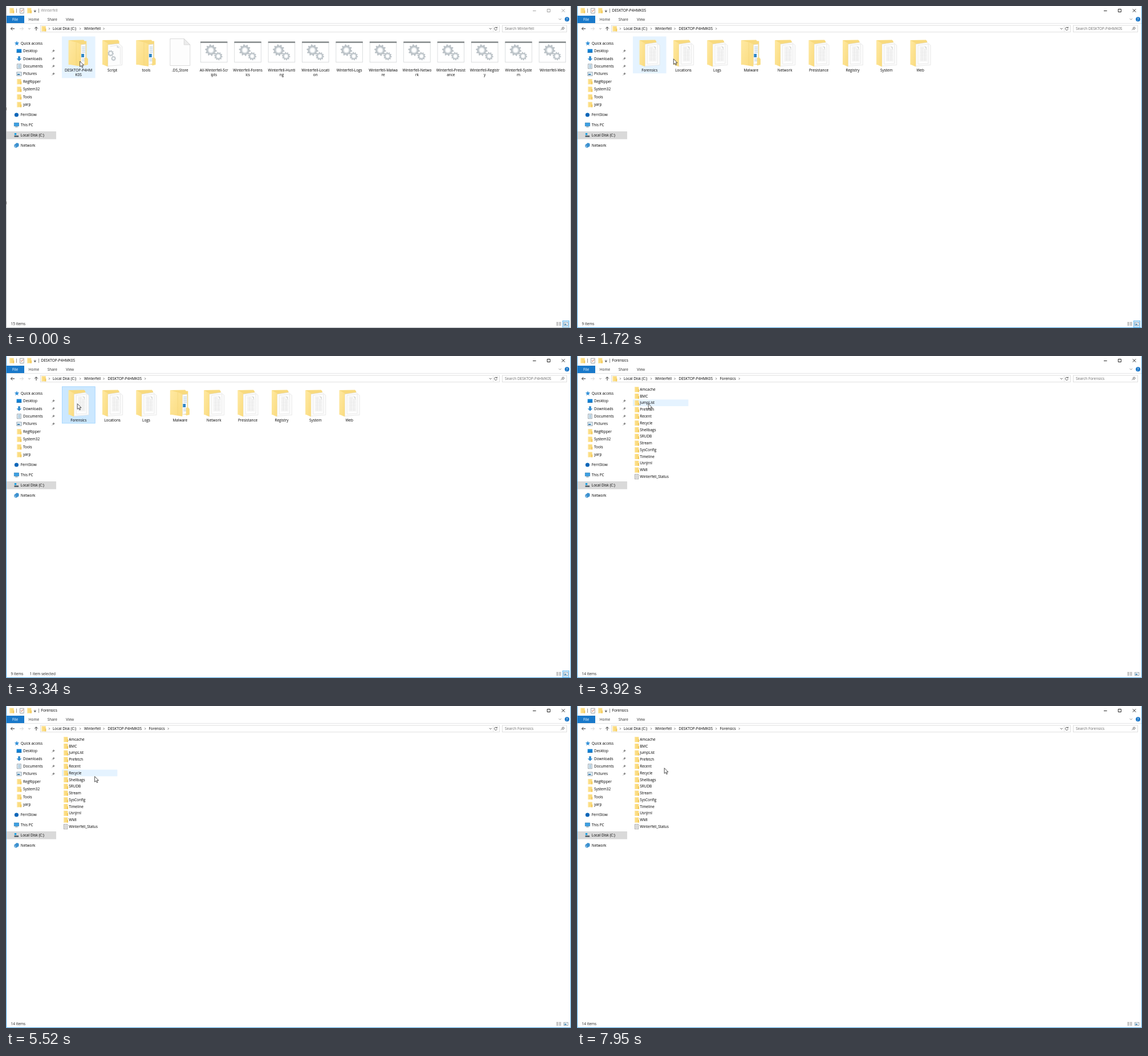
Animation, 991 px wide and 565 px high, one loop 8 s. Source, as an HTML page:

```html
<!DOCTYPE html>
<html lang="en">
<head>
<meta charset="utf-8">
<title>File browser</title>
<style>
html, body { margin: 0; width: 100%; height: 100%; overflow: hidden; background: #fff; }
svg { display: block; width: 991px; height: 565px; }
text { font-family: "Open Sans", "Noto Sans", sans-serif; font-size: 6.45px; white-space: pre; }
</style>
</head>
<body>
<svg id="stage" viewBox="0 0 991 565">
  <defs>
    <linearGradient id="flap" x2="1" y2="1">
      <stop offset="0" stop-color="#ffe9a2"/><stop offset="1" stop-color="#fadb7e"/>
    </linearGradient>
  </defs>
  <g id="window"></g>
  <g id="hover"></g>
  <g id="content"></g>
  <path id="cursor" d="M0 0V9.6L2.2 7.6L3.8 11L5.3 10.3L3.8 7H6.8Z" fill="#fff" stroke="#222" stroke-width=".8"/>
</svg>
<script>
const LOOP = 8000;
const $ = id => document.getElementById(id);

const rect = (x, y, w, h, fill, stroke = 'none', sw = 1) =>
  `<rect x="${x}" y="${y}" width="${w}" height="${h}" fill="${fill}" stroke="${stroke}" stroke-width="${sw}"/>`;
const fillPath = (d, fill, stroke = 'none', sw = .6) =>
  `<path d="${d}" fill="${fill}" stroke="${stroke}" stroke-width="${sw}"/>`;
const line = (d, stroke, sw = 1) => fillPath(d, 'none', stroke, sw);
const disc = (x, y, r, fill) => `<circle cx="${x}" cy="${y}" r="${r}" fill="${fill}"/>`;
const text = (x, mid, s, fill = '#000', anchor = 'start') =>
  `<text x="${x}" y="${mid + 2.2}" fill="${fill}" text-anchor="${anchor}">${s}</text>`;
const at = (x, y, body) => `<g transform="translate(${x} ${y})">${body}</g>`;

const chevron = (x, y) => line(`M${x - .8} ${y - 1.7}l1.7 1.7l-1.7 1.7`, '#555', .8);
const smallFolder = (x, y) =>
  rect(x, y - 4.4, 7.4, 9, '#fbdc80') + rect(x + 5.8, y - .2, 2.2, 4.8, '#f3c95c') +
  rect(x, y - 4.4, 1.4, 9, '#ffe9a9');

function gear(x, y, r, teeth) {
  const n = teeth * 4;
  const pts = Array.from({ length: n }, (_, i) => {
    const a = (i + .5) / n * Math.PI * 2;
    const q = i % 4 < 2 ? r : r * .78;
    return (x + q * Math.cos(a)).toFixed(2) + ' ' + (y + q * Math.sin(a)).toFixed(2);
  });
  return fillPath('M' + pts.join('L') + 'Z', '#bcc3c8') + disc(x, y, r * .53, '#dfe4e7') + disc(x, y, r * .36, '#fff');
}

// Large icons, centred on x = 0 of their cell.
const leaf = () => fillPath('M-17.4 60L-8 65.5V106.5L-17.4 102.5Z', 'url(#flap)');
const back = () => fillPath('M-17.4 60L10 59.5L12 62V103H-17.4Z', '#f8da7e');

function pageFolder() {
  let rows = '';
  for (let y = 72; y < 97; y += 2.4) rows += `M-1 ${y}H${y < 75 ? 7 : 12}`;
  return back() + fillPath('M-8 67L12 64L18 69V103.5L-8 105.5Z', '#fcfcfc', '#dcdcdc') +
    fillPath('M-4 69L14 67V101L-4 102Z', '#fdfdfd', '#dedede') +
    line(rows, '#dcdcdc', .7) + line('M3 72V96M8 75V96', '#e4e4e4', .6) +
    fillPath('M7 70l4 2v5z', '#d8dad8') + leaf();
}
function gearFolder() {
  return back() + fillPath('M-8 68L11 66L17 71V103.5L-8 105.5Z', '#fdfdfd', '#d5d5d5') +
    line('M-4 71L8 69L14 72V102', '#dedede', .7) + fillPath('M8 69v4l5 1z', '#d5dadd') +
    gear(-3, 83, 5.6, 8) + gear(2, 92, 4.4, 8) + leaf();
}
function fullFolder() {
  return fillPath('M-17.4 60L9 59.5L10.5 61.5H14V103H-17.4Z', '#f8da7e') +
    fillPath('M4 68L12.5 67V101L4 103Z', '#fafafa', '#dcdcdc') +
    line('M6 72H11.5M6 75H11.5M6 78H11.5M6 81H11.5M6 93H11.5M6 96H11.5', '#9dbfda', .9) +
    rect(5, 84, 4.8, 6, '#2f87c7') + fillPath('M10.5 91L14 90L16.6 93V103L10.5 104.5Z', '#f9dc82') +
    fillPath('M-17.4 60L-3 64L4 67V106L-17.4 102.5Z', 'url(#flap)') +
    line('M-4 64V104', '#f3d47c', .7);
}
const blankPage = () =>
  fillPath('M-17.5 57.5H7L17.5 68V104.5H-17.5Z', '#fdfdfd', '#d2d2d2', .8) +
  fillPath('M7 57.5V68H17.5Z', '#ececec', '#d2d2d2', .8);
const batch = () =>
  rect(-23.3, 63.5, 46.6, 35.2, '#fff', '#d3d6d8', .8) + rect(-23.7, 62.4, 47.4, 2.3, '#7b8082') +
  gear(-5.2, 77.5, 10.3, 10) + gear(7.8, 88, 7.4, 10);

const ROOT = [
  ['DESKTOP-P4HM|K0S', fullFolder], ['Script', gearFolder], ['tools', fullFolder], ['.DS_Store', blankPage],
  ...['All-Winterfell-Scr|ipts', 'Winterfell-Forens|ics', 'Winterfell-Hunti|ng', 'Winterfell-Locati|on',
    'Winterfell-Logs', 'Winterfell-Malwa|re', 'Winterfell-Netwo|rk', 'Winterfell-Presist|ance',
    'Winterfell-Registr|y', 'Winterfell-Syste|m', 'Winterfell-Web'].map(n => [n, batch])
];
const HOST = ['Forensics', 'Locations', 'Logs', 'Malware', 'Network', 'Presistance', 'Registry', 'System', 'Web']
  .map(n => [n, n === 'Malware' ? fullFolder : pageFolder]);
const LIST = ['Amcache', 'BMC', 'JumpList', 'Prefetch', 'Recent', 'Recycle', 'Shellbags', 'SRUDB',
  'Stream', 'SysConfig', 'Timeline', 'UsnJrnl', 'WMI', 'Winterfell_Status'];

const cellX = i => 127.2 + i * 59.37;
const rowY = i => 58.7 + i * 11.77;

const iconGrid = items => items.map(([name, icon], i) =>
  at(cellX(i), 0, icon() + name.split('|').map((s, k) => text(0, 112.5 + k * 8.3, s, '#000', 'middle')).join(''))).join('');

const fileRows = () => LIST.map((name, i) => {
  const y = rowY(i);
  const icon = i < LIST.length - 1 ? smallFolder(101, y)
    : rect(101.4, y - 4, 6.4, 8.2, '#f4f4f4', '#8d8d8d', .7) +
      line(`M102.6 ${y - 2}h4M102.6 ${y}h4M102.6 ${y + 2}h4`, '#999', .6);
  return icon + text(110.2, y, name);
}).join('');

const FOLDERS = {
  root: { path: [], title: 'Winterfell', count: 15, body: iconGrid(ROOT) },
  host: { path: ['DESKTOP-P4HMK0S'], title: 'DESKTOP-P4HMK0S', count: 9, body: iconGrid(HOST) },
  list: { path: ['DESKTOP-P4HMK0S', 'Forensics'], title: 'Forensics', count: 14, body: fileRows() }
};

function titleBar(title, active) {
  const ink = active ? '#111' : '#999';
  return smallFolder(6.3, 8) + line('M18.5 4.5V12M57.5 4.5V12', '#777', .8) +
    rect(24.6, 4.2, 6.6, 8.2, '#fff', '#8a8a8a', .8) + line('M26 8l1.4 1.7l2.8-3.6', '#c0502c', .9) +
    smallFolder(37, 8) + line('M48.8 7.8h4', '#333', .7) + fillPath('M48.8 9h4l-2 2z', '#333') +
    text(61.6, 8.2, title, active ? '#000' : '#8a8a8a') +
    line('M924 8.5h5.6M949.3 5.5h5v5h-5zM974.8 5.3l5.4 5.4m0-5.4l-5.4 5.4', ink, .9);
}

function ribbon() {
  return rect(0, 17, 32, 13, '#1979ca') + text(16, 23.4, 'File', '#fff', 'middle') +
    text(39.8, 23.4, 'Home', '#333') + text(72.8, 23.4, 'Share', '#333') + text(105, 23.4, 'View', '#333') +
    line('M1 30.5H990', '#e4e5e6') + line('M969.5 22l2.2 2.2l2.2-2.2', '#777', .8) +
    disc(984, 23.3, 4, '#1c78c9') + text(984, 23.3, '?', '#fff', 'middle');
}

function addressBar(folder) {
  const crumbs = [[82, 'Local Disk (C:)'], [137, 'Winterfell'], [178.5, folder.path[0]], [250.5, folder.path[1]]];
  const ends = [130, 171.5, 244, 284.5];
  return line('M15 39.8H8.5m2.8-2.8l-2.8 2.8l2.8 2.8', '#333', 1) +
    line('M24 39.8h6.5m-2.8-2.8l2.8 2.8l-2.8 2.8', '#d0d0d0', .9) +
    line('M39.3 39l1.7 1.7l1.7-1.7', '#777', .8) + line('M53 43V36.8m-2.8 2.8l2.8-2.8l2.8 2.8', '#333', 1) +
    rect(60.5, 34, 805, 11.7, '#fff', '#dcdcdc', .9) + smallFolder(62.4, 39.8) + chevron(75.8, 39.8) +
    crumbs.slice(0, 2 + folder.path.length).map(([x, s], i) => text(x, 39.8, s) + chevron(ends[i], 39.8)).join('') +
    line('M847.8 38.8l2 2l2-2', '#444', .9) + line('M854.5 34V45.7', '#e2e2e2', .8) +
    line('M861 38.4a2.5 2.5 0 1 0 .4 2M861.4 36.6v2h-2', '#444', .8) +
    rect(870.5, 34, 113, 11.7, '#fff', '#dcdcdc', .9) + text(875, 39.8, 'Search ' + folder.title, '#6d6d6d') +
    line('M973.3 42.3l2.1-2.1M975.3 39a1.8 1.8 0 1 0 3.6 0a1.8 1.8 0 1 0 -3.6 0', '#444', .8);
}

function sidebar() {
  const pin = y => at(83, y, fillPath('M.3-2.8L2.8-.3L1.5 .2L.3 1.7L-1.8-.4L-.2-1.5Z', '#888') + line('M-.8 .8L-2.6 2.6', '#888', .7));
  const monitor = (x, y) => rect(x, y - 4, 8.4, 5.8, '#3ba0e4', '#3278a8', .6) + rect(x + 2, y + 2.6, 4.4, 1, '#607985');
  const icons = [
    y => rect(18.6, y - 3.4, 8.6, 6.2, '#0f83d8') + rect(18.6, y + 1.8, 8.6, 1, '#0b5a98'),
    y => fillPath(`M21.2 ${y - 4.2}h3.6v4h2.6l-4.4 4.4l-4.4-4.4h2.6z`, '#2f8bd0'),
    y => rect(19.6, y - 4, 6.6, 8, '#fff', '#7c8e9b', .8) + line(`M21 ${y - 2}h4M21 ${y}h4M21 ${y + 2}h4`, '#4b8dbc', .8),
    y => rect(18.9, y - 3.2, 8.2, 6.2, '#e9f3f9', '#7c8e9b', .8) + rect(20, y - .3, 4.4, 2, '#397eae')
  ];
  const names = ['Desktop', 'Downloads', 'Documents', 'Pictures', 'RegRipper', 'System32', 'Tools', 'yarp'];
  const favourites = names.map((name, i) => {
    const y = 79 + i * 13.42;
    return (icons[i] ? icons[i](y) + pin(y) : smallFolder(19.3, y)) + text(30, y, name);
  }).join('');
  return rect(1, 220, 87, 13.7, '#d9d9d9') +
    fillPath('M19 61.3l1.2 2.7l3 .3l-2.3 2l.7 2.9l-2.6-1.5l-2.6 1.5l.7-2.9l-2.3-2l3-.3z', '#3b94d8') +
    text(25.8, 65.4, 'Quick access') + favourites +
    disc(18.4, 191, 3.6, '#0a66b8') + text(25.8, 190.8, 'FernStow') +
    monitor(14.2, 209) + text(25.8, 208.8, 'This PC') +
    rect(14.8, 223, 3.4, 3.4, '#1ba1e2') + rect(14.5, 227.3, 7.6, 2.6, '#555f66') + text(25.8, 226.6, 'Local Disk (C:)') +
    fillPath('M14 244l5-4l3.5 1.6v4.4l-5 3l-3.5-2z', '#3b90cf') + fillPath('M14 244l3.5 1.6v3.4l-3.5-2z', '#7fb9e2') +
    text(25.8, 244.5, 'Network');
}

function statusBar(folder, selected) {
  let s = text(8.5, 558.2, folder.count + ' items', '#222');
  if (selected) s += text(folder.count > 9 ? 45.5 : 41.5, 558.2, '1 item selected', '#222');
  if (folder !== FOLDERS.list) s += rect(976.4, 552.4, 11.2, 11.6, '#cce8ff', '#5db5ec', .9);
  return s + line('M965.3 555.3h3.6M970 555.3h3.6M965.3 557.6h3.6M970 557.6h3.6M965.3 559.9h3.6M970 559.9h3.6', '#777', .9) +
    rect(978.6, 555.2, 7.2, 5.2, '#f8fbfd', '#7b8790', .7) + rect(979.6, 557.6, 3.4, 1.8, '#2b78ad');
}

// Window states: start, folder, contents loaded, active, item selected.
const VIEWS = [
  [0, 'root', true, false, false],
  [150, 'root', true, true, true],
  [570, 'host', false, true, false],
  [700, 'host', true, true, false],
  [3340, 'host', true, true, true],
  [3650, 'list', false, true, false],
  [3780, 'list', true, true, false]
];

// Pointer samples: start, x, y, item under the pointer (-1 for none).
const MOVES = [
  [0, 129.7, 97, 0], [570, 129.7, 97, -1], [840, 129.7, 97, 0],
  [1720, 169.3, 92.8, 0], [1870, 178, 103, 1], [2010, 181, 111, 1], [2160, 174, 108, 1],
  [2300, 158, 99, 1], [2450, 138, 89, 0], [2600, 125.2, 83.7, 0],
  [3650, 125.2, 83.7, -1], [3920, 125.2, 83.7, 2],
  [4660, 127, 77, 2], [4800, 132, 67, 1], [4950, 139, 60, 0], [5090, 146, 70, 1],
  [5230, 151, 91, 3], [5380, 154, 111, 4], [5520, 155.6, 123.6, 5], [5670, 155.6, 124.4, 6],
  [5970, 156, 133, 6], [6110, 156, 148, 8], [6260, 156, 168, 9], [6410, 157, 190, 11],
  [6560, 157, 205.5, 12], [6700, 156.5, 199.7, 12], [6820, 156, 188, 11], [6950, 155.5, 178, 10],
  [7100, 155, 170, 9], [7250, 154.5, 160, 9], [7400, 154, 150, 8],
  [7830, 153.5, 131, -1], [7950, 153.2, 108.8, -1]
];

const stepAt = (steps, t) => steps.findLast(s => s[0] <= t);

function drawWindow([, key, loaded, active, selected]) {
  const folder = FOLDERS[key];
  $('window').innerHTML = rect(0, 0, 991, 565, '#fff') +
    titleBar(folder.title, active) + ribbon() + addressBar(folder) + sidebar() + statusBar(folder, selected) +
    line('M.5 0V564.5H990.5V0', active ? '#4aa2e0' : '#b3b9be') +
    (active ? '' : rect(0, 178, 1, 5, '#666') + rect(0, 343, 1, 5, '#666'));
  $('content').innerHTML = loaded ? folder.body : '';
}

function drawHover([, key, , , selected], i) {
  const height = key === 'root' ? 73 : 64.8;
  let box = '';
  if (i >= 0 && key === 'list') box = rect(98, rowY(i) - 5.9, 97.4, 11.7, '#e5f3ff');
  else if (i >= 0 && selected) box = rect(cellX(i) - 28.8, 53.8, 57.8, height - .6, '#cce8ff', '#99d1ff', .8);
  else if (i >= 0) box = rect(cellX(i) - 29.2, 53.4, 58.6, height, '#e5f3ff');
  $('hover').innerHTML = box;
}

let lastView, lastMove;
function render(t) {
  const view = stepAt(VIEWS, t), move = stepAt(MOVES, t);
  if (view !== lastView) drawWindow(view);
  if (view !== lastView || move !== lastMove) {
    drawHover(view, move[3]);
    $('cursor').setAttribute('transform', `translate(${move[1]} ${move[2]})`);
  }
  lastView = view;
  lastMove = move;
}

const start = performance.now();
function tick() {
  render((performance.now() - start) % LOOP);
  requestAnimationFrame(tick);
}
tick();
</script>
</body>
</html>
```
